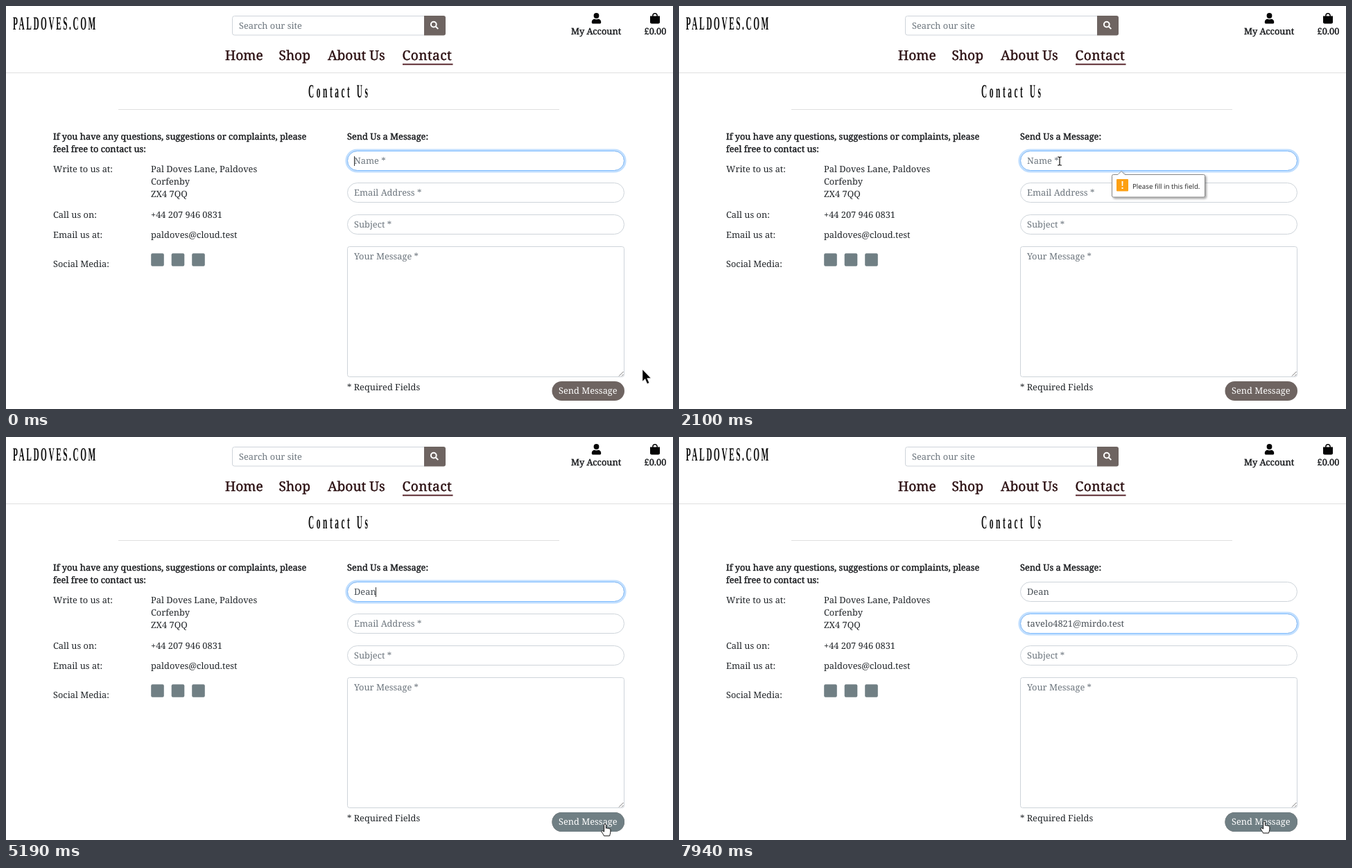
Write an HTML page that moves like this. It is 962x582 px and loops after 8000 ms.

```html
<!DOCTYPE html>
<html lang="en">
<head>
<meta charset="utf-8">
<title>Contact Us</title>
<style>
html, body { margin: 0; width: 100%; height: 100%; overflow: hidden; background: #fff; }
svg { display: block; width: 962px; height: 582px; }
text { font: 12.8px "Noto Serif", serif; fill: #212529; text-rendering: geometricPrecision; white-space: pre; }
.slim text { font: bold 27px "Liberation Serif", serif; fill: #0c0c0c; }
.semi text { fill: #17191c; stroke: #17191c; stroke-width: .4px; }
.nav text { font-size: 19.2px; fill: #2a0e10; stroke: #2a0e10; stroke-width: .4px; }
.hint text, text.hint { fill: #6c757d; }
.value { fill: #495057; }
.box { fill: #fff; stroke: #ced4da; }
.line { stroke: #dfdfdf; }
.brown { fill: #6e6461; }
.slate { fill: #707f84; }
.edge { fill: none; stroke: #80bdff; }
.glow { fill: none; stroke: #007bff; stroke-opacity: .25; stroke-width: 2.6px; }
text.note { font: 9.75px "Open Sans", sans-serif; fill: #222; }

.ring, .tip, .caret, .hover, .press, .cursor, .cursor *, .typed, .typed tspan, .gone {
  animation-duration: 8s; animation-iteration-count: infinite; animation-timing-function: linear;
}
.caret, .cursor *, .typed, .typed tspan, .gone { animation-timing-function: step-end; }

/* focus */
#ring1 { animation-name: ring1; }
#ring2 { animation-name: ring2; }
@keyframes ring1 { 0%, 14% { opacity: 1 } 15.75% { opacity: 0 } 17.6%, 65.5% { opacity: 1 } 67.4%, to { opacity: 0 } }
@keyframes ring2 { 0%, 66.5% { opacity: 0 } 68.4%, to { opacity: 1 } }

#caret1 { animation-name: caret1; }
#caret2 { animation-name: caret2; }
@keyframes caret1 {
  0%, 7.5%, 15.75%, 29%, 42.1%, 63% { opacity: 1 }
  .87%, 14%, 22.37%, 35.6%, 56.37%, 65.6%, to { opacity: 0 }
  0% { transform: translateX(0) }
  42.1% { transform: translateX(9.5px) }
  46.3% { transform: translateX(16.5px) }
  46.95% { transform: translateX(23.5px) }
  49.7%, to { transform: translateX(31px) }
}
@keyframes caret2 {
  0%, 73.1%, 92.75%, to { opacity: 0 }
  66.5%, 79.75%, 86.1% { opacity: 1 }
  0% { transform: translateX(0) }
  86.1%, to { transform: translateX(139px) }
}

/* typing */
#k1 { animation-name: k1; }
#k2 { animation-name: k2; }
#k3 { animation-name: k3; }
#k4 { animation-name: k4; }
#mail { animation-name: mail; }
#hint1 { animation-name: hint1; }
#hint2 { animation-name: hint2; }
@keyframes k1 { 0% { fill-opacity: 0 } 42.1%, to { fill-opacity: 1 } }
@keyframes k2 { 0% { fill-opacity: 0 } 46.3%, to { fill-opacity: 1 } }
@keyframes k3 { 0% { fill-opacity: 0 } 46.95%, to { fill-opacity: 1 } }
@keyframes k4 { 0% { fill-opacity: 0 } 49.7%, to { fill-opacity: 1 } }
@keyframes mail { 0% { fill-opacity: 0 } 86.1%, to { fill-opacity: 1 } }
@keyframes hint1 { 0% { fill-opacity: 1 } 42.1%, to { fill-opacity: 0 } }
@keyframes hint2 { 0% { fill-opacity: 1 } 86.1%, to { fill-opacity: 0 } }

/* validation bubbles */
.tip { transform-origin: 624px 243px; }
#tip1 { animation-name: tip1; }
#tip2 { animation-name: tip2; }
@keyframes tip1 {
  0%, 15.75% { opacity: 0 } 18%, 42.1% { opacity: 1 } 44.4%, to { opacity: 0 }
  0%, 18.5% { transform: scaleX(.985) } 25%, to { transform: none }
}
@keyframes tip2 {
  0%, 66.6% { opacity: 0 } 69%, 86.1% { opacity: 1 } 87.2%, to { opacity: 0 }
  0%, 69% { transform: scaleX(.985) } 78%, to { transform: none }
}

/* button */
.hover { animation-name: hover; }
.press { animation-name: press; }
@keyframes hover {
  0%, 7.5% { opacity: 0 } 9.4%, 23% { opacity: 1 } 24.9%, 61.2% { opacity: 0 }
  63%, 69.1% { opacity: 1 } 71%, 97.2% { opacity: 0 } 99.1%, to { opacity: 1 }
}
@keyframes press {
  0%, 13.5% { opacity: 0 } 15%, 15.6% { opacity: 1 } 17.5%, 65.5% { opacity: 0 }
  66.5% { opacity: 1 } 68.4%, to { opacity: 0 }
}

/* pointer */
.cursor { animation-name: move; animation-timing-function: ease-in-out; }
#arrow { animation-name: arrow; }
#hand { animation-name: hand; }
#beam { animation-name: beam; }
@keyframes move {
  0%, 4.9% { transform: translate(918px, 525px) }
  9.9%, 13.1% { transform: translate(862px, 555px) }
  14.6%, 21.4% { transform: translate(858px, 549px) }
  26.1% { transform: translate(549px, 224px) }
  28.9%, 35.6% { transform: translate(546px, 220px) }
  36.9% { transform: translate(550px, 219px) }
  38%, 56.3% { transform: translate(546px, 223px) }
  62% { transform: translate(862px, 562px) }
  63% { transform: translate(862px, 565px) }
  64.8%, 68% { transform: translate(864px, 559px) }
  73.2% { transform: translate(606px, 325px) }
  75.9% { transform: translate(598px, 313px) }
  80.4%, 88.6% { transform: translate(561px, 270px) }
  98.3%, to { transform: translate(844px, 555px) }
}
@keyframes arrow { 0% { opacity: 1 } 7.5%, to { opacity: 0 } }
@keyframes hand { 0%, 23%, 69.1% { opacity: 0 } 7.5%, 61.2%, 97.2%, to { opacity: 1 } }
@keyframes beam { 0%, 61.2%, 97.2%, to { opacity: 0 } 23%, 69.1% { opacity: 1 } }
</style>
</head>
<body>
<svg viewBox="0 0 962 582">
  <defs>
    <filter id="shade" x="-10%" y="-20%" width="125%" height="160%">
      <feDropShadow dx="2" dy="2" stdDeviation="1.5" flood-opacity=".35"/>
    </filter>
    <g id="focus">
      <rect class="edge" x="492.500" y="209.500" width="399" height="28" rx="14"/>
      <rect class="glow" x="490.700" y="207.700" width="402.600" height="31.600" rx="15.800"/>
    </g>
    <g id="bubble">
      <path d="M626.500 243.500H633L638 238.500 643 243.500H756.500Q758.500 243.500 758.500 245.500V274Q758.500 276 756.500 276H626.500Q624.500 276 624.500 274V245.500Q624.500 243.500 626.500 243.500Z" fill="#fff" stroke="#868686" filter="url(#shade)"/>
      <rect x="631" y="250" width="17" height="17.500" rx="1" fill="#fda012"/>
      <path d="M638.500 253h2l-.3 7h-1.400zM638.500 262h2v2h-2z" fill="#fff"/>
      <text class="note" x="654" y="263.500">Please fill in this field.</text>
    </g>
  </defs>

  <!-- header -->
  <g class="slim">
    <text transform="translate(10 34) scale(.42 1)" letter-spacing="6">PALDOVES.COM</text>
    <text transform="translate(436 132) scale(.42 1)" letter-spacing="8.500">Contact Us</text>
  </g>
  <path class="box" d="M603 14.500H329.500a3 3 0 0 0-3 3V39a3 3 0 0 0 3 3H603"/>
  <text class="hint" x="336" y="33">Search our site</text>
  <path class="brown" d="M603 14h28a3 3 0 0 1 3 3V39.500a3 3 0 0 1-3 3H603z"/>
  <g fill="none" stroke="#fff" stroke-width="2">
    <circle cx="616.800" cy="26.600" r="3.900"/>
    <path d="M619.700 29.500L623.300 33.100"/>
  </g>
  <g fill="#050505">
    <circle cx="851.500" cy="14" r="3.900"/>
    <path d="M844.800 25.400V23a4.200 4.200 0 0 1 4.200-4.200q2.500 1 5 0a4.200 4.200 0 0 1 4.200 4.200v1a1.400 1.400 0 0 1-1.400 1.400H846.200a1.400 1.400 0 0 1-1.400-1.400z"/>
    <path d="M929 14.500H943V23.300a2.200 2.200 0 0 1-2.200 2.200H931.200a2.200 2.200 0 0 1-2.200-2.200z"/>
    <path d="M932.900 15V13.800a3.100 3.100 0 0 1 6.200 0V15" fill="none" stroke="#050505" stroke-width="1.500"/>
  </g>
  <g class="semi">
    <text x="815" y="41">My Account</text>
    <text x="920.500" y="41">£0.00</text>
  </g>
  <g class="nav">
    <text x="316" y="77.500">Home</text>
    <text x="393.500" y="77.500">Shop</text>
    <text x="464" y="77.500">About Us</text>
    <text x="571.500" y="77.500" letter-spacing=".4">Contact</text>
  </g>
  <path d="M572 84.200H644.500" stroke="#5b2a30" stroke-width="2"/>
  <path class="line" d="M0 96.500H962M162 149.500H798"/>

  <!-- details -->
  <g class="semi">
    <text x="68" y="192.500">If you have any questions, suggestions or complaints, please</text>
    <text x="68" y="210.500">feel free to contact us:</text>
    <text x="492" y="192.500">Send Us a Message:</text>
  </g>
  <text x="68" y="240">Write to us at:</text>
  <text x="209" y="240">Pal Doves Lane, Paldoves</text>
  <text x="209" y="258">Corfenby</text>
  <text x="209" y="275.500">ZX4 7QQ</text>
  <text x="68" y="305.500">Call us on:</text>
  <text x="209" y="305.500">+44 207 946 0831</text>
  <text x="68" y="335">Email us at:</text>
  <text x="209" y="335">paldoves@cloud.test</text>
  <text x="68" y="376.500">Social Media:</text>
  <g class="slate">
    <rect x="209.200" y="357.200" width="18.600" height="18.600" rx="2"/>
    <rect x="238.700" y="357.200" width="18.600" height="18.600" rx="2"/>
    <rect x="268.200" y="357.200" width="18.600" height="18.600" rx="2"/>
  </g>

  <!-- form -->
  <g class="box">
    <rect x="492.500" y="209.500" width="399" height="28" rx="14"/>
    <rect x="492.500" y="255.500" width="399" height="28" rx="14"/>
    <rect x="492.500" y="301.500" width="399" height="28" rx="14"/>
    <rect x="492.500" y="347.500" width="399" height="188" rx="3"/>
  </g>
  <path d="M884 534.500L890.500 528M888 534.500L890.500 532" stroke="#777"/>
  <g class="ring" id="ring1"><use href="#focus"/></g>
  <g class="ring" id="ring2"><use href="#focus" y="46"/></g>
  <g class="hint">
    <text class="gone" id="hint1" x="502" y="228">Name *</text>
    <text class="gone" id="hint2" x="502" y="274">Email Address *</text>
    <text x="502" y="320">Subject *</text>
    <text x="502" y="365.500">Your Message *</text>
  </g>
  <text class="value typed" x="502" y="228"><tspan id="k1">D</tspan><tspan id="k2">e</tspan><tspan id="k3">a</tspan><tspan id="k4">n</tspan></text>
  <text class="value typed" id="mail" x="502" y="274">tavelo4821@mirdo.test</text>
  <rect class="caret" id="caret1" x="502" y="217" width="1" height="14" fill="#333"/>
  <rect class="caret" id="caret2" x="502" y="263" width="1" height="14" fill="#333"/>
  <text x="492" y="555">* Required Fields</text>
  <rect class="press" x="786.200" y="540.700" width="107" height="30.600" rx="15.300" fill="none" stroke="#707f84" stroke-opacity=".5" stroke-width="2.600"/>
  <rect class="brown" x="787.500" y="542" width="104.500" height="28" rx="14"/>
  <rect class="slate hover" x="787.500" y="542" width="104.500" height="28" rx="14"/>
  <text x="797" y="560" style="fill:#fff">Send Message</text>

  <g class="tip" id="tip1"><use href="#bubble"/></g>
  <g class="tip" id="tip2"><use href="#bubble" y="46"/></g>

  <g class="cursor">
    <path id="arrow" d="M0 0V17l3.800-3.600 3 7 2.800-1.200-3-6.700H12z" fill="#000" stroke="#fff" stroke-width=".4"/>
    <path id="hand" d="M-1.400 1.400a1.400 1.400 0 0 1 2.800 0V6.200a1.300 1.300 0 0 1 2.300.3 1.300 1.300 0 0 1 2.200.5 1.300 1.300 0 0 1 2 1.100V12c0 2-1.300 3-1.300 5H-1.600c-.4-2-3.200-4.600-3.500-6.300-.2-1.300 1.500-1.700 2.200-.6L-1.400 11z" fill="#fff" stroke="#111"/>
    <path id="beam" d="M-3-6H-1L0-5 1-6H3M0-5V5M-3 6H-1L0 5 1 6H3" fill="none" stroke="#111" stroke-width="1.200"/>
  </g>
</svg>
</body>
</html>
```
